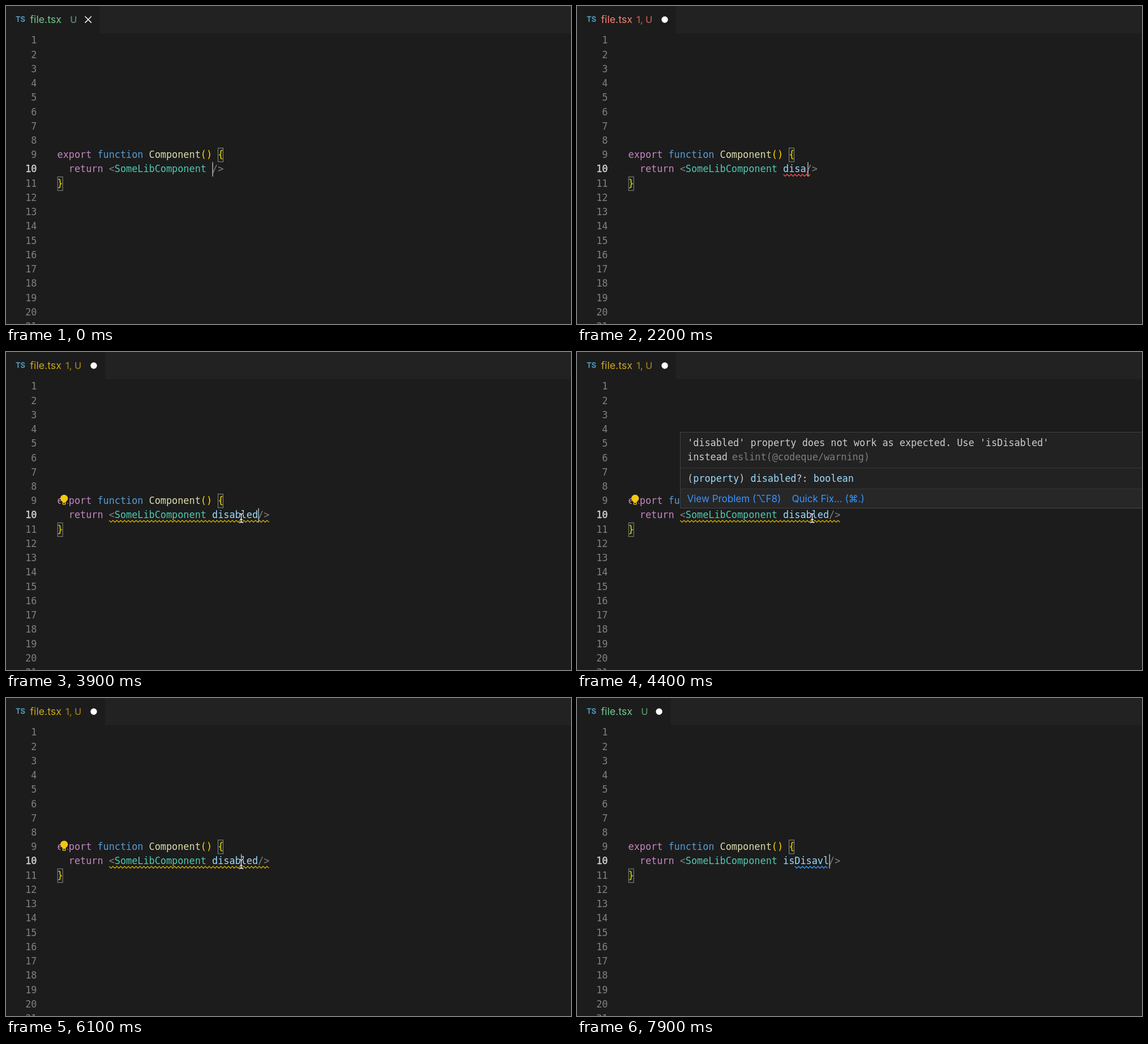
Recreate the animation shown at these times as an HTML page. Size 998 by 561 pixels, loop 8000 ms.

```html
<!DOCTYPE html>
<html lang="en">
<head>
<meta charset="utf-8">
<title>Editor</title>
<style>
html, body { margin: 0; width: 100%; height: 100%; overflow: hidden; background: #1c1c1c; }
svg { display: block; }
text { white-space: pre; }
.code { font: 16.83px "DejaVu Sans Mono", monospace; }
.ui { font: 17px Inter, "DejaVu Sans", sans-serif; }
</style>
</head>
<body>
<svg id="stage" width="998" height="561" viewBox="0 0 998 561"></svg>
<script>
const LOOP = 8000, X0 = 90.5, CW = 10.13, LH = 25.24, ATTR = 27;
const stage = document.getElementById('stage');
const colX = c => X0 + c * CW;
const lineY = n => 66.3 + (n - 1) * LH;

function add(tag, attrs, parent = stage) {
  const el = document.createElementNS('http://www.w3.org/2000/svg', tag);
  for (const k in attrs) el.setAttribute(k, attrs[k]);
  parent.appendChild(el);
  return el;
}
function label(x, y, str, fill, cls = 'code', parent = stage) {
  const el = add('text', { x, y, fill, class: cls }, parent);
  el.textContent = str;
  return el;
}
// Runs of [text, colour] on the character grid
function runs(x, y, parts, parent) {
  for (const [str, fill] of parts) {
    label(x, y, str, fill, 'code', parent);
    x += str.length * CW;
  }
}
const show = (el, on) => el.setAttribute('visibility', on ? 'visible' : 'hidden');
const clamp = v => Math.max(0, Math.min(1, v));

const KEYWORD = '#c586c0', GREY = '#808080', GOLD = '#ffd700', ATTRIB = '#9cdcfe', LIGHT = '#cccccc', LINK = '#3794ff';

// Tab bar
const strip = add('rect', { y: 0, width: 998, height: 48, fill: '#222222' });
label(17, 28, 'TS', '#519aba', 'ui').setAttribute('style', 'font-size:13px;font-weight:700');
const file = label(42.5, 30, 'file.tsx', '', 'ui');
file.style.fontSize = '17.8px';
const badge = label(0, 30, '', '', 'ui');
badge.style.fontSize = '16.5px';
badge.style.fontWeight = 500;
const cross = add('path', { d: 'M139.5 18.2l11.4 11.4m0-11.4l-11.4 11.4', stroke: '#f0f0f0', 'stroke-width': 1.6 });
const dot = add('circle', { cy: 24, r: 5.7, fill: '#ffffff' });

// Line numbers
for (let n = 1; n <= 21; n++) {
  const num = label(54.5, lineY(n), n, n === 10 ? '#cfcfcf' : '#808080');
  num.setAttribute('text-anchor', 'end');
  if (n === 10) num.setAttribute('style', 'stroke:#cfcfcf;stroke-width:.5px');
}

// Code
const selection = add('rect', { x: colX(ATTR), y: 275, width: 8 * CW, height: 25, fill: '#264f78' });
for (const [x, y] of [[374.5, 250.5], [91.2, 301.3]])
  add('rect', { x, y, width: 9, height: 24.3, fill: '#1b241b', stroke: '#888888' });
runs(X0, lineY(9), [['export ', KEYWORD], ['function ', '#569cd6'], ['Component', '#dcdcaa'], ['() {', GOLD]]);
runs(colX(2), lineY(10), [['return ', KEYWORD], ['<', GREY], ['SomeLibComponent', '#4ec9b0']]);
label(X0, lineY(11), '}', GOLD);
const attr = label(colX(ATTR), lineY(10), '', ATTRIB);
const close = label(0, lineY(10), '/>', GREY);
const squiggle = add('path', { fill: 'none', 'stroke-width': 1.4 });

// Lightbulb
const bulb = add('g', {});
add('rect', { x: 96.5, y: 252, width: 12, height: 18, fill: '#1c1c1c' }, bulb);
add('circle', { cx: 102.6, cy: 258.3, r: 6.6, fill: '#f2c811' }, bulb);
add('path', { d: 'M99.8 262v7.4h5.6v-7.4z', fill: '#f2c811' }, bulb);
add('rect', { x: 101.2, y: 266, width: 2.8, height: 2.2, fill: '#1c1c1c' }, bulb);

const caret = add('rect', { y: 275.5, width: 1.5, height: 25.3, fill: '#b4b4b2' });

// Hover card
const card = add('g', {});
add('rect', { x: 182.5, y: 141.5, width: 830, height: 134, fill: '#222223', stroke: '#434343' }, card);
add('rect', { x: 183, y: 242, width: 830, height: 33, fill: '#272728' }, card);
add('path', { d: 'M183 204.5H998M183 241.5H998', stroke: '#363636' }, card);
label(195, 166, "'disabled' property does not work as expected. Use 'isDisabled'", LIGHT, 'code', card);
label(195, 191.2, 'instead', LIGHT, 'code', card);
label(273.8, 191.2, 'eslint(@codeque/warning)', '#7d7d7d', 'code', card);
runs(195, 229, [['(', LIGHT], ['property', ATTRIB], [') ', LIGHT], ['disabled', ATTRIB], ['?: ', LIGHT], ['boolean', ATTRIB]], card);
label(194.5, 265, 'View Problem (⌥F8)', LINK, 'ui', card);
label(379.5, 265, 'Quick Fix... (⌘.)', LINK, 'ui', card);

// Text pointer
const pointer = add('g', { fill: 'none', 'stroke-linecap': 'round' });
const beam = 'M-3.5-8Q0-8 0-5.5Q0-8 3.5-8M0-6V6M-3.5 8Q0 8 0 5.5Q0 8 3.5 8M-2 2.5H2';
add('path', { d: beam, stroke: '#111111', 'stroke-width': 3 }, pointer);
add('path', { d: beam, stroke: '#f4f4f4', 'stroke-width': 1.4 }, pointer);

// Typing and caret moves
const typed = [
  [0, ''], [1000, 'd'], [1130, 'di'], [1300, 'dis'], [1460, 'disa'], [1700, 'disav'],
  [2140, 'disa'], [2290, 'disab'], [2390, 'disabl'], [2490, 'disable'], [2590, 'disabled'],
  [6690, 'i'], [6770, 'is'], [6980, 'isD'], [7140, 'isDi'], [7280, 'isDis'],
  [7430, 'isDisa'], [7580, 'isDisav'], [7690, 'isDisavl']
];
const moves = typed.map(([t, s]) => [t, ATTR + s.length])
  .concat([[5950, 32], [6300, 35]]).sort((a, b) => a[0] - b[0]);
const lastIndex = (list, t) => list.reduce((k, e, i) => e[0] <= t ? i : k, 0);

function caretCol(t) {
  const i = lastIndex(moves, t), [start, col] = moves[i];
  const from = i ? moves[i - 1][1] : col;
  return from + (col - from) * clamp((t - start) / 80);
}
function caretAlpha(t) {
  if (t < 1000) return 1 - clamp((t - 100) / 350);
  if (t < 2900 || t >= 5900) return 1;
  const p = (t + 400) % 1000;
  return p < 550 ? 1 : p < 700 ? 1 - (p - 550) / 150 : p < 900 ? 0 : (p - 900) / 100;
}
function wave(a, b) {
  let d = '';
  const step = 3.4;
  for (let x = a, i = 0; x <= b; x += step, i++)
    d += (i ? 'L' : 'M') + x.toFixed(1) + ' ' + (i % 2 ? 300.2 : 297);
  return d;
}
function underline(t, len) {
  if (t >= 1780 && t < 2600) return ['#f14c4c', ATTR, ATTR + Math.max(5, len)];
  if (t >= 2680 && t < 6690) return ['#cca700', 9, 37];
  if (t >= 7800) return ['#3794ff', 29, 35];
  return null;
}
function tabState(t) {
  if (t >= 1700 && t < 2680) return ['#f88070', '#bb5a50', true];
  if (t >= 2680 && t < 6790) return ['#cca71c', '#967c1c', true];
  return ['#73c991', '#55906b', false];
}

function draw(t) {
  const text = typed[lastIndex(typed, t)][1];
  attr.textContent = text;
  close.setAttribute('x', colX(ATTR + text.length));

  const [main, dim, problem] = tabState(t);
  const edge = problem ? 175 : 165.5;
  strip.setAttribute('x', edge);
  file.setAttribute('fill', main);
  badge.setAttribute('fill', dim);
  badge.setAttribute('x', problem ? 105 : 113.3);
  badge.textContent = problem ? '1, U' : 'U';
  dot.setAttribute('cx', problem ? 155 : 145);
  show(dot, t >= 1000);
  show(cross, t < 1000);

  const line = underline(t, text.length);
  show(squiggle, line);
  if (line) {
    squiggle.setAttribute('stroke', line[0]);
    squiggle.setAttribute('d', wave(colX(line[1]) + .5, colX(line[2]) + .5));
  }

  show(bulb, t >= 2800 && t < 7200);
  show(card, t >= 4050 && t < 5950);
  show(selection, t >= 6300 && t < 6690);
  caret.setAttribute('x', colX(caretCol(t)) + .3);
  caret.setAttribute('opacity', caretAlpha(t));

  const k = 1 - Math.pow(1 - clamp((t - 3350) / 400), 2);
  pointer.setAttribute('transform', `translate(${436 - 20.5 * k} ${345 - 52 * k})`);
  show(pointer, t >= 3350 && t < 6690);
}

const begin = performance.now();
function tick() {
  draw((performance.now() - begin) % LOOP);
  requestAnimationFrame(tick);
}
draw(0);
requestAnimationFrame(tick);
</script>
</body>
</html>
```
